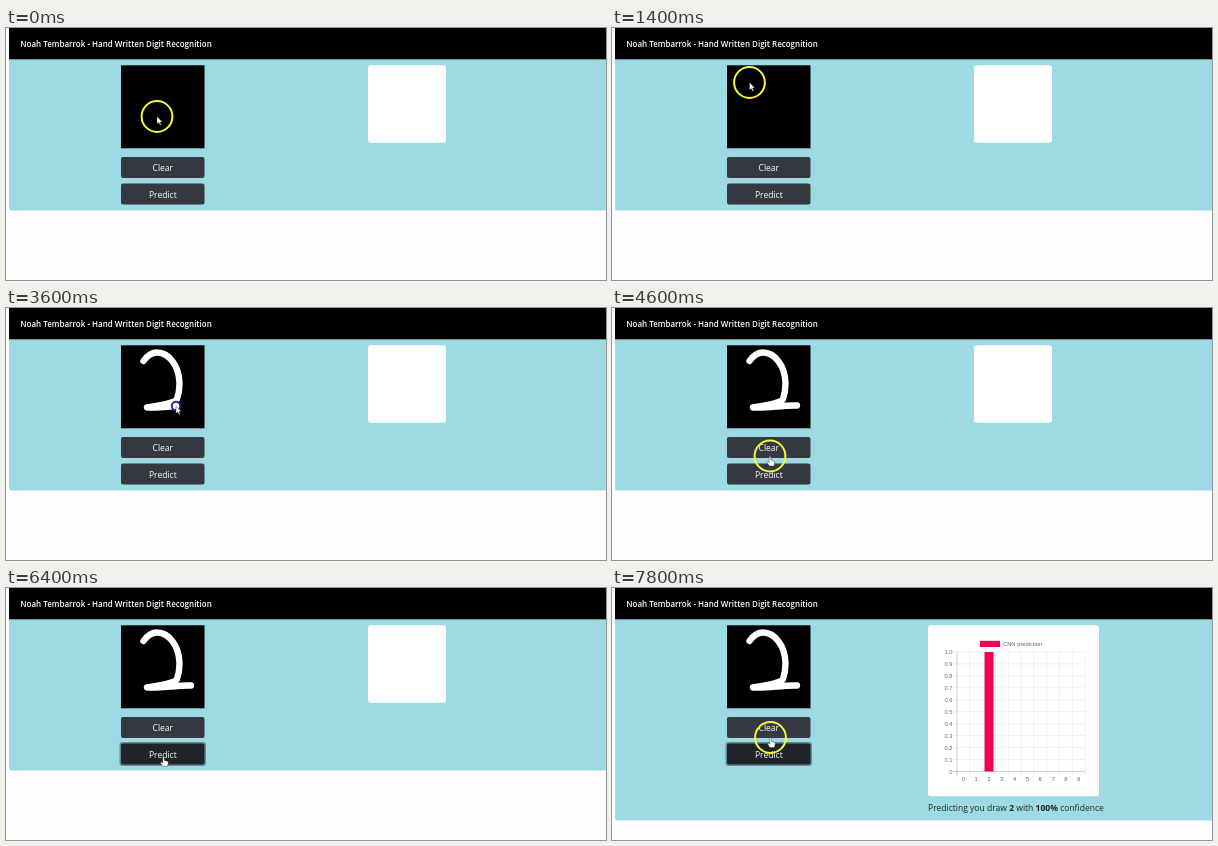
Recreate the animation shown at these times as an HTML page. Size 600 px wide and 252 px high, loop 8000 ms.

```html
<!DOCTYPE html>
<html lang="en">
<head>
<meta charset="utf-8">
<title>Hand Written Digit Recognition</title>
<style>
  html, body { margin: 0; width: 100%; height: 100%; overflow: hidden; background: #fdfdff; }
  svg { display: block; width: 100%; height: 100%; }
  text { font: 8.55px "Open Sans", "Noto Sans", sans-serif; }
  .title { font-size: 8px; font-weight: 600; fill: #fff; }
  .label { fill: #fff; text-anchor: middle; }
  .button { fill: #343a40; }
  .caption { fill: #212529; }
  .caption tspan { font-weight: 700; }
  #chart text { font: 5.8px "Liberation Sans", Arial, sans-serif; fill: #666; }
</style>
</head>
<body>
<svg viewBox="0 0 600 252">
  <rect id="panel" x="3" y="20" width="610" rx="3" fill="#9edae3"/>
  <rect x="3" width="597" height="31.3"/>
  <text class="title" x="14.3" y="18.6">Noah Tembarrok - Hand Written Digit Recognition</text>

  <rect x="115" y="37.3" width="83.5" height="83"/>
  <path id="digit" fill="none" stroke="#fff" stroke-width="6.4" stroke-linecap="round" stroke-linejoin="round"
    d="M137.5 53C141 48 146 44.5 151 44.5C163 44.5 173 58 173.5 75Q173.5 84 171 91C168 96 155 97 141 99.5C155 100.5 170 97 185 97.5"/>

  <rect class="button" x="115" y="129" width="83.5" height="21" rx="2"/>
  <text class="label" x="156.8" y="142.8">Clear</text>
  <rect id="glow" x="113.5" y="154" width="86.5" height="24" rx="3.2" fill="#343a40" opacity=".5"/>
  <rect id="predict" class="button" x="115" y="155.5" width="83.5" height="21" rx="2"/>
  <text class="label" x="156.8" y="169.5">Predict</text>

  <rect id="card" y="37.3" rx="3" fill="#fff"/>
  <g id="result">
    <g id="chart">
      <rect x="368" y="52.8" width="20" height="6.2" fill="#f50057"/>
      <text x="391" y="58">CNN prediction</text>
      <g id="grid"></g>
      <rect id="bar" x="372.5" width="9" fill="#f50057"/>
    </g>
    <text class="caption" x="316" y="223.3">Predicting you draw <tspan>2</tspan> with <tspan>100%</tspan> confidence</text>
  </g>

  <g id="cursor">
    <circle id="ring" fill="none" stroke-width="2"/>
    <path id="arrow" d="M0 0V7.6L1.8 6L3 8.8L4.2 8.2L3 5.5H5.4Z" fill="#fff" stroke="#222" stroke-width=".4"/>
    <path id="hand" d="M-.8 .8Q0 -.4 .8 .8V4L3.8 4.7Q4.9 5 4.8 6.2L4 10H-.6L-3 6.6Q-3 5.3 -1.9 5.7L-.8 6.6Z" fill="#fff" stroke="#222" stroke-width=".4"/>
  </g>
</svg>
<script>
const STEP = 200, STEPS = 40;
const PRESS = 8, RELEASE = 22, CLICK = 31, RESULT = 33;
const $ = id => document.getElementById(id);
const set = (id, attrs) => {
  for (const name in attrs) $(id).setAttribute(name, attrs[name]);
};
const show = (id, on) => { $(id).style.display = on ? '' : 'none'; };

// [step, x, y]
const moves = [
  [0, 151, 88.5], [1, 135, 120], [2, 57, 140], [3, 150, 153], [4, 330, 110],
  [5, 421, 75], [6, 186, 30], [7, 137.5, 54.5], [22, 180, 106], [23, 158, 148],
  [24, 157, 161], [25, 157, 171.5], [27, 157.5, 170], [32, 157.5, 168.5],
  [34, 157.5, 168.5], [39, 158.5, 149.5]
];
// [step, share of the digit drawn]
const strokes = [
  [8, 0], [9, .08], [10, .16], [11, .25], [12, .34], [13, .487], [14, .57],
  [15, .65], [16, .705], [17, .78], [18, .9], [19, .96], [20, 1]
];

function sample(table, step) {
  const next = table.findIndex(row => row[0] >= step);
  if (next < 0) return table[table.length - 1].slice(1);
  if (next === 0) return table[0].slice(1);
  const a = table[next - 1], b = table[next];
  const k = (step - a[0]) / (b[0] - a[0]);
  return a.slice(1).map((v, i) => v + (b[i + 1] - v) * k);
}

function buildGrid() {
  const left = 345, right = 473, top = 64, bottom = 183.5;
  const line = (x1, y1, x2, y2, shade) =>
    `<path d="M${x1} ${y1}L${x2} ${y2}" stroke="#000" stroke-opacity="${shade}" stroke-width=".6"/>`;
  let out = '';
  for (let i = 0; i <= 10; i++) {
    const x = left + i * (right - left) / 10;
    const y = bottom - i * (bottom - top) / 10;
    const shade = i ? .1 : .3;
    out += line(x, top, x, bottom + 5, shade) + line(left - 4, y, right, y, shade);
    const value = i % 10 ? (i / 10).toFixed(1) : i ? '1.0' : '0';
    out += `<text x="340.5" y="${y + 2}" text-anchor="end">${value}</text>`;
    if (i < 10) out += `<text x="${x + 6.4}" y="193" text-anchor="middle">${i}</text>`;
  }
  $('grid').innerHTML = out;
}

const length = $('digit').getTotalLength();

function draw(step) {
  const drawing = step >= PRESS && step < RELEASE;
  const clicked = step >= CLICK;
  const done = step >= RESULT;
  const drawn = sample(strokes, step)[0] * length;

  show('digit', step >= PRESS);
  set('digit', { 'stroke-dasharray': `${drawn + .01} ${length * 2}` });

  let [x, y] = sample(moves, step);
  if (drawing) ({ x, y } = $('digit').getPointAtLength(drawn));
  set('cursor', { transform: `translate(${x} ${y})` });
  const small = drawing || step === CLICK;
  set('ring', { r: small ? 4.2 : 15.4, stroke: small ? '#2424a8' : '#f8f636' });
  show('ring', step <= CLICK || step > 34);
  show('arrow', step <= RELEASE);
  show('hand', step > RELEASE);

  const hovered = step >= 24 && step < 37;
  $('predict').style.fill = clicked ? '#1f2428' : hovered ? '#23272b' : '';
  show('glow', clicked);

  set('panel', { height: done ? 212.5 : 162.5 });
  set('card', done ? { x: 316, width: 171, height: 171 } : { x: 362, width: 78, height: 77.5 });
  show('result', done);
  const t = Math.min(1, .2 * (step - RESULT + 1));
  const height = done ? 119.5 * (1 - (1 - t) ** 4) : 0;
  set('bar', { y: 183.5 - height, height });
}

buildGrid();
const start = performance.now();
let last = -1;
function tick() {
  const step = Math.floor((performance.now() - start) / STEP) % STEPS;
  if (step !== last) draw(last = step);
  requestAnimationFrame(tick);
}
tick();
</script>
</body>
</html>
```
